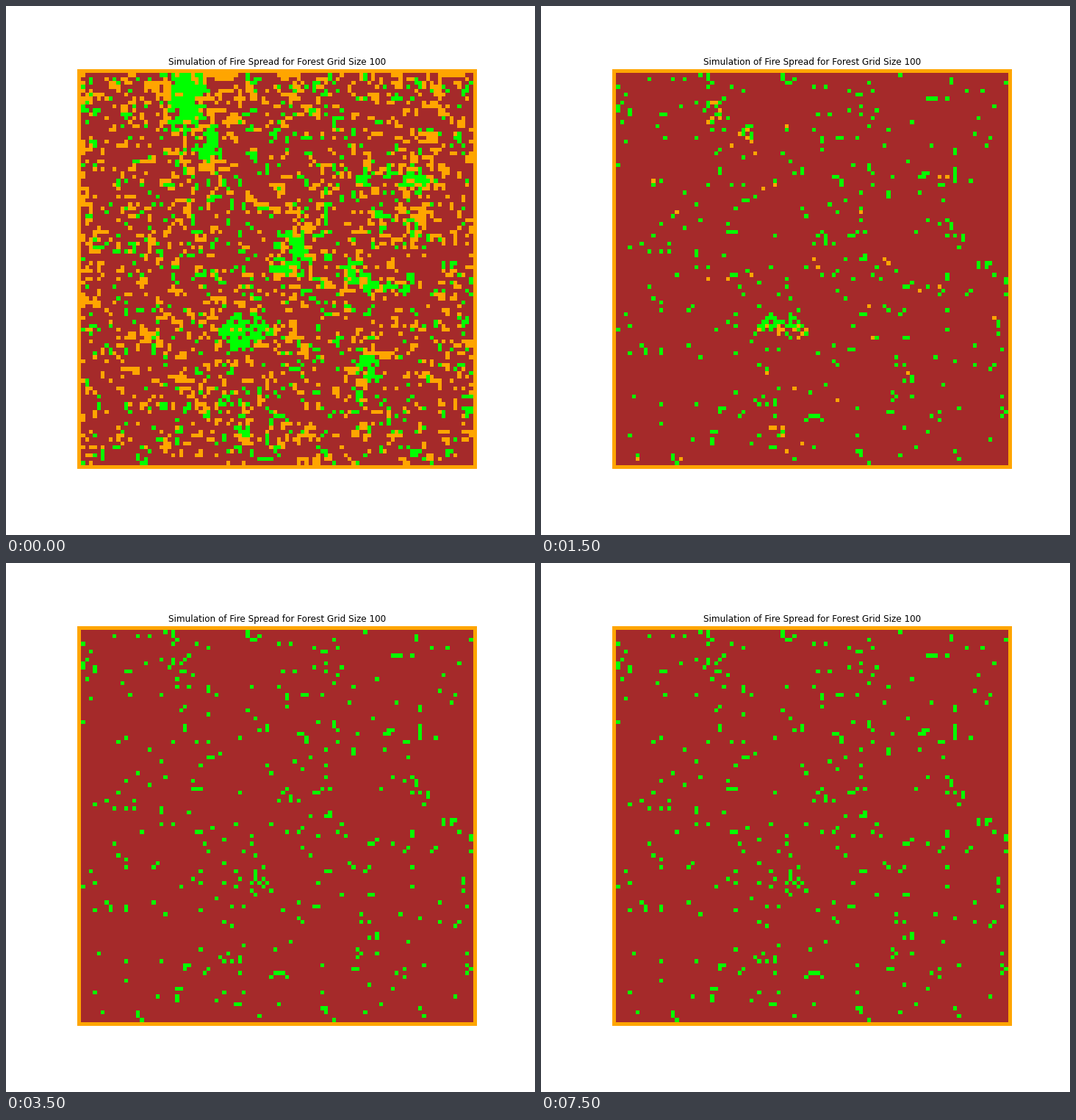
A matplotlib script that plays this animation: 720 by 720 pixels, repeating every 8000 ms.

```python
import numpy as np
import matplotlib.pyplot as plt
from matplotlib.animation import FuncAnimation
from matplotlib.colors import ListedColormap

SIZE = 102          # 100 cells plus a burning border
STEPS = 16
STEP_MS = 500
NEVER = 99
LAST_FRONT = 6      # the fire front dies out after this step
BURNT, TREE, FIRE = range(3)

# Dense stands: centre column and row, half width and height,
# and how many steps the fire needs to climb through
STANDS = [
    (28, 7, 4.5, 8, 0.6), (33.5, 19, 3, 5, 3), (73, 28, 2, 2.5, 0.6),
    (86, 28, 4, 2.5, 1), (56, 46, 2.5, 5, 1), (52, 50, 3, 2.5, 0.8),
    (71, 51, 3.5, 3, 1), (77, 54, 2.5, 2, 0.4), (43, 67, 6.5, 4, 4.5),
    (74, 74, 3, 4, 0.5), (41.5, 92, 2, 2, 4),
]
HOT_SPOTS = [(22, 6), (37, 9), (90, 24), (85, 40), (28, 79), (35, 89)]
LATE_STRIKES = {11: (25, 15), 14: (83, 39)}     # step: column, row

rows, cols = np.mgrid[:SIZE, :SIZE]


def clumped_noise(rng):
    """Uniform values in 0..1 in which neighbours tend to be alike."""
    n = rng.normal(size=(SIZE, SIZE))
    for axis, shift in ((0, 1), (1, 1)):
        n = n + 0.35 * np.roll(n, shift, axis)
    return n.ravel().argsort().argsort().reshape(n.shape) / n.size


def ignition_steps(seed=7):
    """Step at which each cell catches fire; negative means burnt before."""
    rng = np.random.default_rng(seed)
    heat = (0.14 + 0.22 * np.exp(-rows / 5) + 0.16 * np.exp(-cols / 4)
            + 0.08 * np.exp((cols - SIZE) / 6))
    for x, y in HOT_SPOTS:
        heat += 0.4 * np.exp(-((cols - x) ** 2 + (rows - y) ** 2) / 14)

    shade = np.zeros((SIZE, SIZE))
    front = np.zeros((SIZE, SIZE))
    for x, y, w, h, climb in STANDS:
        d2 = ((cols - x) / w) ** 2 + ((rows - y) / h) ** 2
        shade = np.maximum(shade, np.exp(-d2 ** 2))
        heat += 0.2 * np.exp(-d2 / 3)
        up = np.clip((y + h - rows) / (2 * h), 0, 1)
        front = np.where(d2 < 1.5, np.maximum(front, climb * up ** 2), front)

    trees = clumped_noise(rng) < 0.082 + 0.72 * shade
    spared = rng.random((SIZE, SIZE)) < 0.38 - 0.3 * shade
    delay = np.minimum(rng.exponential(0.7, (SIZE, SIZE)), 2.9)
    step = np.minimum(1 + np.floor(front + delay), LAST_FRONT)

    burn = np.where(clumped_noise(rng) < heat, 0, -1)
    burn = np.where(trees, np.where(spared, NEVER, step), burn)
    for when, (x, y) in LATE_STRIKES.items():
        burn[y, x] = when
    return burn


burn = ignition_steps()


def forest(step):
    grid = np.select([burn > step, burn == step], [TREE, FIRE], BURNT)
    grid[[0, -1], :] = FIRE
    grid[:, [0, -1]] = FIRE
    return grid


fig = plt.figure(figsize=(10, 10), dpi=72, facecolor="white")
ax = fig.add_axes([0.135, 0.125, 0.755, 0.755])
ax.set_axis_off()
ax.set_title("Simulation of Fire Spread for Forest Grid Size 100", fontsize=12)
image = ax.imshow(forest(0), cmap=ListedColormap(["brown", "lime", "orange"]),
                  vmin=BURNT, vmax=FIRE, interpolation="nearest")


def update(step):
    image.set_data(forest(step))
    return [image]


anim = FuncAnimation(fig, update, frames=STEPS, interval=STEP_MS,
                     repeat=True, repeat_delay=0)
plt.show()
```
